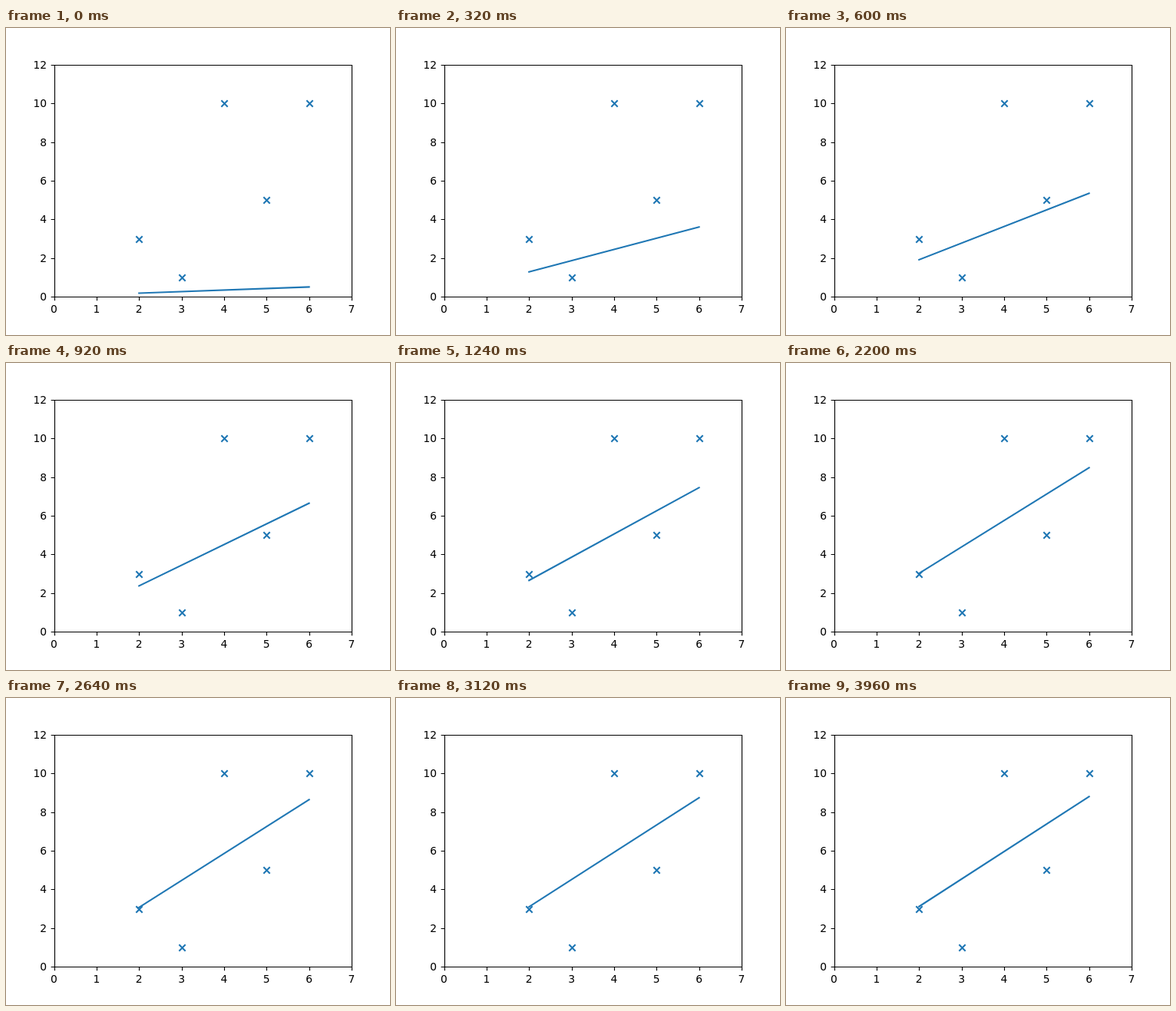
Write an HTML page that moves like this. It is 500 by 400 pixels and loops after 4 s.

```html
<!DOCTYPE html>
<html lang="en">
<head>
<meta charset="utf-8">
<title>Linear regression by gradient descent</title>
<style>
  html, body { margin: 0; width: 100%; height: 100%; overflow: hidden; background: #fff; }
  svg { display: block; }
  text { font: 13.89px "DejaVu Sans", sans-serif; fill: #000; }
  .axes { fill: none; stroke: #000; stroke-width: 1.11; }
  .data { fill: none; stroke: #1f77b4; stroke-width: 2.08; }
  #fit { stroke-linecap: square; }
</style>
</head>
<body>
<svg width="500" height="400" viewBox="0 0 500 400">
  <path id="axes" class="axes"/>
  <g id="labels"></g>
  <path id="points" class="data"/>
  <path id="fit" class="data"/>
</svg>
<script>
const POINTS = [[2, 3], [3, 1], [4, 10], [5, 5], [6, 10]];
const STEPS = 100, STEP_MS = 40, RATE = 0.003;

const $ = id => document.getElementById(id);
const px = x => 62.5 + x * 387.5 / 7;
const py = y => 350 - y * 302 / 12;
const snap = v => Math.floor(v + 0.5) + 0.5;

function label(text, x, y, anchor) {
  const node = document.createElementNS("http://www.w3.org/2000/svg", "text");
  node.setAttribute("x", x);
  node.setAttribute("y", y);
  node.setAttribute("text-anchor", anchor);
  node.textContent = text;
  $("labels").append(node);
}

function drawAxes() {
  let d = "M63.5 48.5H450.5V350.5H63.5Z";
  for (let x = 0; x <= 7; x++) {
    d += `M${snap(px(x))} 350.5v4.86`;
    label(x, px(x), 371, "middle");
  }
  for (let y = 0; y <= 12; y += 2) {
    d += `M63.5 ${snap(py(y))}h-4.86`;
    label(y, 53.2, snap(py(y)) + 4.5, "end");
  }
  $("axes").setAttribute("d", d);
}

function drawPoints() {
  const r = 4.17;
  $("points").setAttribute("d", POINTS.map(([x, y]) =>
    `M${snap(px(x)) - r} ${snap(py(y)) - r}l${2 * r} ${2 * r}m0 ${-2 * r}l${-2 * r} ${2 * r}`
  ).join(""));
}

// Slope and intercept after each gradient step on the mean squared error.
function train() {
  const fits = [];
  let slope = 0, bias = 0;
  for (let i = 0; i < STEPS; i++) {
    let gradSlope = 0, gradBias = 0;
    for (const [x, y] of POINTS) {
      const error = y - slope * x - bias;
      gradSlope += error * x / POINTS.length;
      gradBias += error / POINTS.length;
    }
    slope += RATE * gradSlope;
    bias += RATE * gradBias;
    fits.push([slope, bias]);
  }
  return fits;
}

const fits = train();
const start = performance.now();

function render(now) {
  const step = Math.floor(Math.max(0, now - start) / STEP_MS) % STEPS;
  const [slope, bias] = fits[step];
  const at = x => `${px(x)} ${py(slope * x + bias)}`;
  $("fit").setAttribute("d", `M${at(2)}L${at(6)}`);
  requestAnimationFrame(render);
}

drawAxes();
drawPoints();
render(start);
</script>
</body>
</html>
```
